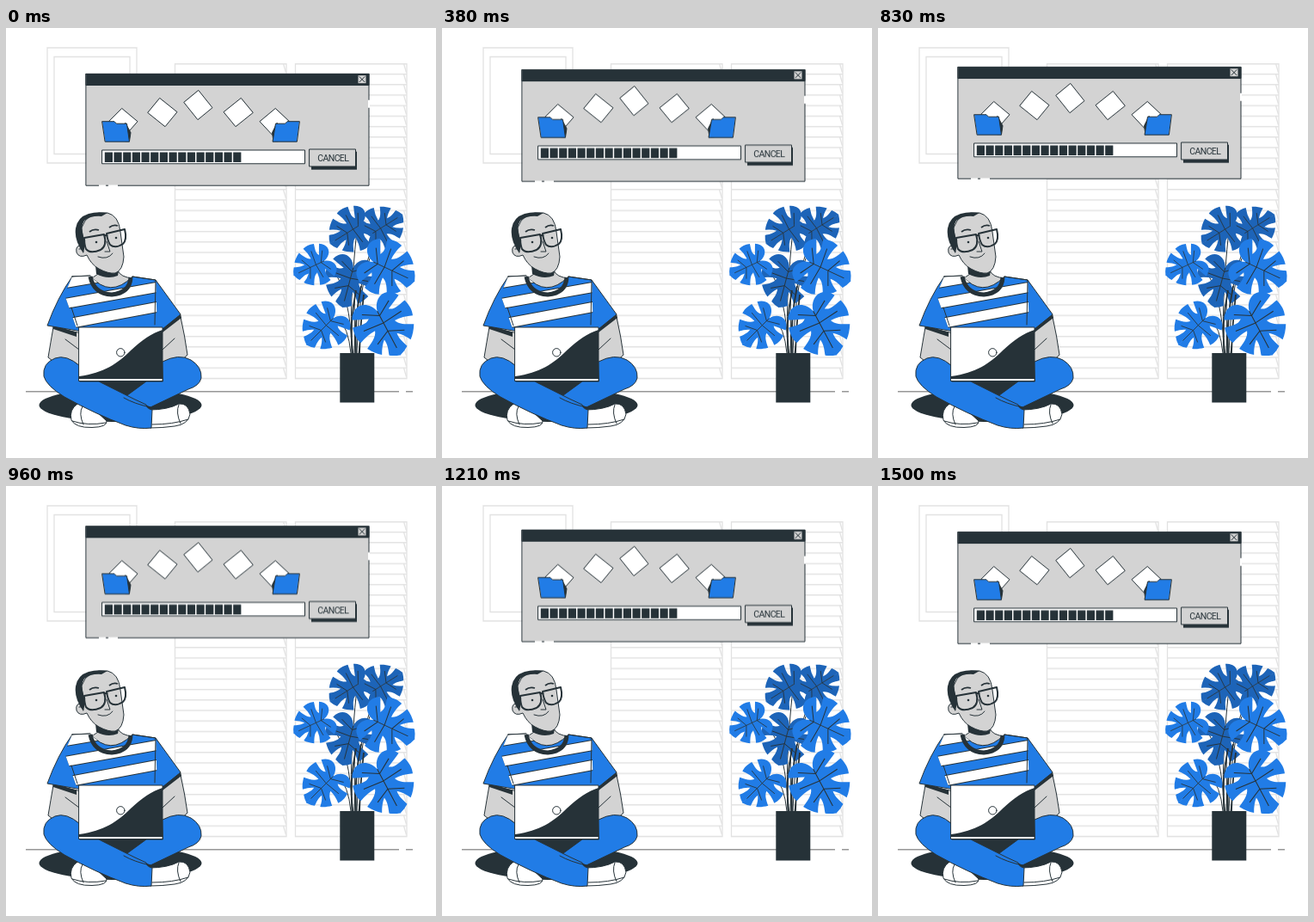
An HTML page that plays this animation: 500 by 500 pixels, repeating every 1540 ms.

```html
<!DOCTYPE html>
<html lang="en">
<head>
<meta charset="utf-8">
<title>File transfer</title>
<style>
  html, body { margin: 0; width: 100%; height: 100%; overflow: hidden; background: #fff; }
  svg { display: block; width: 100vw; height: 100vh; --ink: #263238; --blue: #217ce6; --deep: #1d64b8; --grey: #d3d3d3; }
  .ink { fill: var(--ink); }
  .blue { fill: var(--blue); }
  .deep { fill: var(--deep); }
  .grey { fill: var(--grey); }
  .white { fill: #fff; }
  .line { stroke: var(--ink); stroke-width: 1; stroke-linejoin: round; stroke-linecap: round; }
  .none { fill: none; }
  .pale { fill: none; stroke: #e2e2e2; stroke-width: 1.3; }
  .label { font: 10.5px Roboto, Arial, sans-serif; font-stretch: 75%; letter-spacing: -.6px; text-anchor: middle; }
  #window { animation: bob 770ms ease-in-out -45ms infinite alternate; }
  @keyframes bob {
    from { transform: translateY(-.2px); }
    to { transform: translateY(-8.6px); }
  }
</style>
</head>
<body>
<svg viewBox="0 0 500 500">
  <defs>
    <pattern id="slats" width="130" height="12.2" patternUnits="userSpaceOnUse" y="40.700">
      <path class="pale" d="M0 .65H130M126.500 .65L129.500 11"/>
    </pattern>
    <g id="blind">
      <rect width="130" height="366" y="42" fill="url(#slats)"/>
      <rect class="pale" x=".5" y="41.700" width="129.500" height="366"/>
    </g>
    <path id="half" d="M0 -15C3 -27 14 -31 21 -25Q24 -23 26 -19Q20 -16 11 -12C16 -8 23 -11 29 -12C31 -5 31 0 29 5Q20 1 11 1C13 7 20 10 26 13C23 18 20 22 16 25Q12 17 7 13C6 20 9 25 10 29Q6 32 -.3 34Z"/>
    <g id="leaf">
      <use href="#half"/>
      <use href="#half" transform="scale(-1 1)"/>
      <path class="none" stroke="#263238" stroke-width=".9" d="M0 -15V26M0 -10L15 -19M0 -10L-15 -19M0 -2L21 -4M0 -2L-21 -4M0 7L15 14M0 7L-15 14"/>
    </g>
    <clipPath id="torso">
      <path d="M77 289L98 288Q121 315 147 289L174 293L176 352H83L68 310Z"/>
    </clipPath>
  </defs>

  <!-- Room -->
  <path class="pale" d="M48 23H152V157H48ZM56 33.500H144V146.500H56Z"/>
  <use href="#blind" x="196"/>
  <use href="#blind" x="336"/>
  <path d="M23 422.800H457M465 422.800H473" stroke="#979797" stroke-width="1.4"/>

  <!-- Transfer window -->
  <g id="window">
    <rect class="grey line" x="93.300" y="53.500" width="328.700" height="130"/>
    <rect class="ink line" x="93.300" y="53.500" width="328.700" height="13.300"/>
    <rect class="grey" x="409.500" y="55.500" width="9" height="9"/>
    <path class="line none" d="M411 57L417 63M417 57L411 63"/>
    <path d="M422 84V93M108 183.500H116M119 183.500H130" stroke="#fff" stroke-width="2"/>
    <g class="white line">
      <path d="M135 94L153 109L139 125L120 109Z"/>
      <path d="M179 82L199 98L185 115L165 99Z"/>
      <path d="M224 73L240 93L223 107L207 87Z"/>
      <path d="M273 82L253 98L267 115L287 99Z"/>
      <path d="M313 94L295 109L310 125L329 109Z"/>
    </g>
    <g class="line">
      <path class="ink" d="M139 111L145 122L143.500 132H139ZM315 111L309.500 122L311 132H316Z"/>
      <path class="blue" d="M112 109H126L128.500 111.500H140.500L143.500 132.500H115.500Z"/>
      <path class="blue" d="M341 109H327L324.500 111.500H313.500L310 132.500H338Z"/>
    </g>
    <rect class="white line" x="112" y="142.300" width="235.500" height="15.800"/>
    <path d="M114.800 150.500H274" fill="none" stroke="#263238" stroke-width="11.500" stroke-dasharray="9.200 1.470"/>
    <rect class="ink" x="355" y="144" width="53" height="21"/>
    <rect class="grey line" x="353" y="141.300" width="53.500" height="20"/>
    <text class="label ink" x="380.300" y="155.700">CANCEL</text>
  </g>

  <!-- Plant -->
  <path class="line none" d="M403 378Q398 330 408 235M405 378Q406 300 432 238M402 378Q402 310 376 273M406 378Q404 320 407 278M408 378Q411 300 423 268M401 378Q398 347 386 338M410 378Q412 346 429 332"/>
  <use href="#leaf" class="deep" transform="translate(402 235) rotate(58) scale(.88)"/>
  <use href="#leaf" class="deep" transform="translate(437 232) rotate(-122) scale(.84)"/>
  <use href="#leaf" class="deep" transform="translate(400 293) rotate(15) scale(.98)"/>
  <path class="none" d="M403 378Q399 345 407 305M407 378Q405 340 413 300M411 378Q412 345 416 310" stroke="#263238" stroke-width="1.800"/>
  <use href="#leaf" class="blue" transform="translate(359 276) rotate(65) scale(.8)"/>
  <use href="#leaf" class="blue" transform="translate(442 279) rotate(-65) scale(1.080)"/>
  <use href="#leaf" class="blue" transform="translate(371 347) rotate(45) scale(.9)"/>
  <use href="#leaf" class="blue" transform="translate(440 345) rotate(-28) scale(1.180)"/>
  <rect class="ink" x="388.300" y="378" width="40" height="57.500"/>

  <!-- Cushion -->
  <ellipse class="ink" cx="133" cy="438.500" rx="94.500" ry="19.500"/>

  <!-- Arms -->
  <g class="grey line">
    <path d="M55 348Q52 365 49 383Q58 393 86 395V355Z"/>
    <path d="M181 349L203 336Q208 358 211 380Q202 391 181 393Z"/>
    <path class="none" d="M69 362L85 374M182 374L196 361"/>
  </g>
  <path class="ink" d="M54 345L82 354V359L55 350ZM182 348L203 332L204 337L182 354Z"/>

  <!-- Shirt -->
  <path class="grey line" d="M106 272L107 286Q102 291 95 291Q120 318 148 291Q133 290 130 282Z"/>
  <path class="blue line" d="M77 289L98 288Q121 315 147 289L174 293L203 333L182 350L176 352H83L48 346Q60 313 77 289Z"/>
  <g clip-path="url(#torso)" fill="none">
    <path id="bands" d="M66 297L178 278M66 321L178 301M66 345L178 324" stroke="#263238" stroke-width="13"/>
    <path d="M66 297L178 278M66 321L178 301M66 345L178 324" stroke="#fff" stroke-width="11.200"/>
  </g>
  <path class="line none" d="M77 289L98 288M147 289L174 293L173 345M76 325L83 346"/>
  <path class="none" d="M98 289Q102 309 123 310Q144 308 145 290" stroke="#263238" stroke-width="5"/>

  <!-- Head -->
  <path class="ink" d="M104 276L131 282L130 288Q118 293 105 286Z"/>
  <path class="grey line" d="M90 252Q80 252 82 261Q85 268 94 264Q99 275 108 280Q119 286 127 285Q136 282 137 266L133 237Q131 218 118 215Q94 213 88 232Z"/>
  <path class="ink" d="M90 262Q79 247 81 233Q83 220 96 216Q106 213 118 215L111 219Q99 218 91 224Q87 230 89 238Q93 250 90 262Z"/>
  <g class="none" stroke="#263238" stroke-width="2" stroke-linejoin="round">
    <path d="M91 244L114 240Q118 253 110 258Q98 263 93 257Q91 252 91 244ZM117 239L138 234Q141 246 136 251Q127 257 121 252Q118 247 117 239Z"/>
    <path d="M114 242Q116 240 118 242M84 250L92 247"/>
  </g>
  <path class="line none" d="M117 248L121 260L115 260M107 266Q118 270 124 262M85 257Q89 256 90 260"/>
  <path class="none" d="M97 237Q102 233 108 235M120 232Q125 228 130 230" stroke="#263238" stroke-width="1.800"/>
  <circle class="ink" cx="105" cy="249" r="1.300"/>
  <circle class="ink" cx="128" cy="244" r="1.300"/>

  <!-- Legs and shoes -->
  <path class="ink" d="M84 400H183L165 425L140 434Z"/>
  <g class="line">
    <path class="blue" d="M182 388Q201 378 215 386Q228 394 227 407Q225 416 212 420L168 441L137 430L163 411H182Z"/>
    <path class="white" d="M83 437Q73 444 76 456Q81 465 100 464.500Q118 464 117 457Q106 447 98 439Z"/>
    <path class="white" d="M167 444Q188 444 201 437Q212 436 214 449Q212 461 196 463Q182 465 168 465Z"/>
    <path class="blue" d="M86 393Q70 379 57 384Q42 390 44 405Q47 416 68 429Q104 449 139 462Q155 467 169 465L170 444Q164 443 163 438L150 432L108 411H86Z"/>
    <path class="none" d="M137 430Q149 437 168 441M89 440Q84 448 90 461M201 438Q197 447 203 460M77 457Q95 463 116 459M170 461Q194 461 212 455"/>
  </g>

  <!-- Laptop -->
  <rect class="white line" x="85" y="348" width="97" height="62.500"/>
  <path class="ink" d="M85 405C114 401 130 390 145 375C158 363 169 355 182 351V407H85Z"/>
  <path class="line none" d="M85 407.500H182"/>
  <circle class="white line" cx="133.300" cy="377.300" r="4.700"/>
</svg>
</body>
</html>
```
